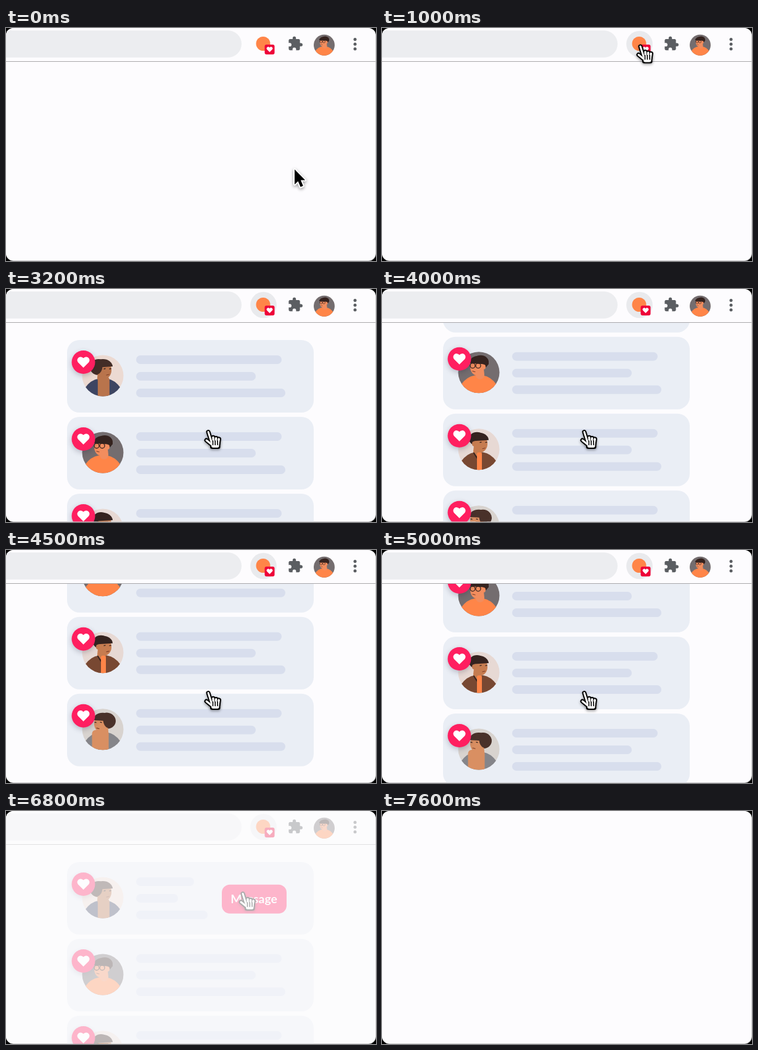
An HTML page with a canvas for the animation above (8400 ms loop, 600 by 379 pixels).

```html
<!DOCTYPE html>
<html lang="en">
<head>
<meta charset="utf-8">
<title>Extension matches</title>
<style>
  html, body { margin: 0; width: 100%; height: 100%; overflow: hidden; background: #000; }
  canvas { display: block; width: 100vw; height: 100vh; }
</style>
</head>
<body>
<canvas id="stage" width="600" height="379"></canvas>
<script>
const ctx = document.getElementById('stage').getContext('2d');
const LOOP = 8400, STEP = 100;
const PAPER = '#fdfcfe', PINK = '#ff1f60', ORANGE = '#ff8548', INK = '#1f1e20', GREY = '#5b5e62';
const DARK = '#35231f';
const CARD_TOP = 83, CARD_PITCH = 125, MAX_SCROLL = 227;

const people = [
  { back: '#ecdad2', skin: '#b9744c', hair: '#432d27', top: '#3d4562', side: 1, arm: 19 },
  { back: '#746d6f', skin: '#f28d5e', hair: DARK, top: ORANGE, side: -1, glasses: true },
  { back: '#e7d9d4', skin: '#c67c50', hair: DARK, top: '#784832', side: 1, tie: true },
  { back: '#d8d3cf', skin: '#d98f62', hair: '#49312a', top: '#85858a', side: -1, arm: 27 }
];

const clamp = v => Math.max(0, Math.min(1, v));
const ease = v => v < .5 ? 2 * v * v : 1 - 2 * (1 - v) ** 2;
const span = (t, from, to) => ease(clamp((t - from) / (to - from)));
const mix = (a, b, k) => a + (b - a) * k;

function box(x, y, w, h, r, fill) {
  ctx.beginPath();
  ctx.roundRect(x, y, w, h, r);
  ctx.fillStyle = fill;
  ctx.fill();
}

function oval(x, y, rx, ry, fill, tilt = 0, from = 0) {
  ctx.beginPath();
  ctx.ellipse(x, y, rx, ry, tilt, from, Math.PI * 2);
  ctx.fillStyle = fill;
  ctx.fill();
}

const disc = (x, y, r, fill) => oval(x, y, r, r, fill);

function line(color, width, x, y, u, v) {
  ctx.beginPath();
  ctx.moveTo(x, y);
  ctx.lineTo(u, v);
  ctx.strokeStyle = color;
  ctx.lineWidth = width;
  ctx.stroke();
}

function text(str, x, y, size, fill, weight = 400, align = 'left') {
  ctx.font = `${weight} ${size}px Lato, sans-serif`;
  ctx.textAlign = align;
  ctx.fillStyle = fill;
  ctx.fillText(str, x, y);
}

function placed(x, y, scale, draw) {
  ctx.save();
  ctx.translate(x, y);
  ctx.scale(scale, scale);
  draw();
  ctx.restore();
}

function shadow(color, blur, dy) {
  ctx.shadowColor = color;
  ctx.shadowBlur = blur;
  ctx.shadowOffsetY = dy;
}

function heart(x, y, r) {
  const lean = Math.PI * .22;
  ctx.beginPath();
  ctx.arc(x - r * .85, y - r * .5, r, Math.PI - lean, -lean);
  ctx.arc(x + r * .85, y - r * .5, r, Math.PI + lean, lean);
  ctx.lineTo(x, y + r * 1.75);
  ctx.fillStyle = '#fff';
  ctx.fill();
}

// One portrait facing right; `side` mirrors it.
function portrait({ skin, hair, top, side, arm, glasses, tie }) {
  ctx.scale(side, 1);
  ctx.lineCap = 'round';
  if (arm) oval(-7, -14, 14, 13, hair, -.2);
  else oval(-3, -17, 13, 11, hair);
  oval(0, 38, 34, 34, top);
  line(skin, 14, -1, -6, -2, 4);
  oval(3, -9, 11, 14, skin);
  oval(0, -14, 16, 13, hair, -.06, Math.PI);
  if (arm) {
    oval(-7, -12, 6, 10, hair, .3);
    box(-5 - arm / 6, 1, arm, 42, 6, skin);
  } else {
    oval(-8, -9, 3, 4, skin);
  }
  if (tie) {
    line(DARK, 2, -8, 6, -3, 14);
    box(-3, 5, 8, 38, 3, ORANGE);
  }
  for (const x of [2, 11]) {
    if (glasses) {
      ctx.beginPath();
      ctx.arc(x - 1, -11, 4, 0, 7);
      ctx.strokeStyle = DARK;
      ctx.lineWidth = 1.3;
      ctx.stroke();
    } else {
      line(DARK, 1.3, x, -11, x + 2, -11.5);
    }
  }
  line('#7d3d27', 1.2, 6, -1, 10, -2);
}

function avatar(person, x, y, r) {
  placed(x, y, r / 33.5, () => {
    disc(0, 0, 33.5, person.back);
    ctx.clip();
    portrait(person);
  });
}

function puzzle() {
  box(2, 5, 17, 17, 2, GREY);
  box(8, 1, 5, 7, 2.5, GREY);
  box(16, 11, 7, 5, 2.5, GREY);
  box(0, 10.8, 6.2, 5.4, 2.7, PAPER);
  box(7.8, 17.8, 5.4, 6.2, 2.7, PAPER);
}

function toolbar(t) {
  box(-40, 4, 422, 44, 22, '#ecedf0');
  ctx.fillStyle = '#a8a7aa';
  ctx.fillRect(0, 54, 600, 1);
  if (t >= 800) disc(417.5, 26, 21.3, '#e9eaed');
  disc(417, 25.5, 11.5, ORANGE);
  box(419.5, 27, 16, 16, 3, '#ee0339');
  heart(427.5, 34.6, 2.6);
  placed(456.3, 12.7, 1.07, puzzle);
  avatar(people[1], 516, 27.7, 17);
  for (let i = -1; i < 2; i++) disc(566, 26.3 + 7.8 * i, 2.5, GREY);
}

function card(person, y, open) {
  box(99, y, 400, 118, 20, '#eaeef5');
  avatar(person, 157, y + 58, 33.5);
  ctx.save();
  shadow('rgba(30,30,60,.25)', 8, 3);
  disc(125.5, y + 36, 19, PINK);
  ctx.restore();
  heart(125.5, y + 35.5, 5.4);
  const wide = [236, 194, 242], narrow = [94, 68, 116];
  wide.forEach((w, i) => box(211, y + 25 + 27 * i, mix(w, narrow[i], open), 14, 7, '#d8deed'));
  if (!open) return;
  ctx.save();
  ctx.globalAlpha *= open;
  box(350, y + 36.7, 105, 47, 13, PINK);
  text('Message', 402, y + 66.5, 19.4, '#fff', 700, 'center');
  ctx.restore();
}

function matches(t) {
  const show = span(t, 2400, 2900);
  if (!show) return;
  const scroll = MAX_SCROLL * (span(t, 3300, 4600) - span(t, 4800, 5520));
  const open = span(t, 5400, 5700);
  ctx.save();
  ctx.beginPath();
  ctx.rect(0, 55, 600, 324);
  ctx.clip();
  ctx.globalAlpha *= show;
  const first = CARD_TOP - scroll + 24 * (1 - show);
  people.forEach((person, i) => card(person, first + CARD_PITCH * i, i ? 0 : open));
  ctx.restore();
}

function menu(t, cursor) {
  const show = span(t, 1000, 1300) * (1 - span(t, 2200, 2500));
  if (!show) return;
  ctx.save();
  ctx.globalAlpha *= show;
  ctx.save();
  shadow('rgba(40,40,50,.2)', 44, 10);
  box(97, 48.5, 348, 215, 18, PAPER);
  ctx.restore();
  text('Dorvell mode', 123, 101, 22.7, INK);
  box(362.5, 77, 57.5, 31.5, 15.75, ORANGE);
  disc(404, 92.5, 13, '#fff');
  ctx.fillStyle = '#e2e1e4';
  ctx.fillRect(123, 130, 297, 1);
  text('My dorvells', 123, 177, 22.7, INK);
  if (cursor.y > 194) box(110, 194, 323, 50, 9, '#f4f2f4');
  text('My matches', 123, 227.5, 22.7, INK);
  box(367, 203.2, 53, 32, 16, PINK);
  text('New', 393.5, 224.3, 16, '#fff', 400, 'center');
  ctx.restore();
}

function cursorAt(t) {
  const stops = [[300, 800, 419, 28], [1300, 1800, 332.5, 222], [2400, 2900, 328, 230.5], [5400, 6000, 384, 132.5]];
  let x = 468, y = 230;
  for (const [from, to, u, v] of stops) {
    const k = span(t, from, to);
    x = mix(x, u, k);
    y = mix(y, v, k);
  }
  return { x, y };
}

function arrow() {
  const shape = new Path2D('M0 0V24.5L5.6 19.2L9.6 28.6L13.8 26.8L9.9 17.6H17.2z');
  ctx.strokeStyle = '#fff';
  ctx.lineWidth = 4;
  shadow('rgba(0,0,0,.4)', 5, 2);
  ctx.stroke(shape);
  shadow('transparent', 0, 0);
  ctx.fillStyle = '#000';
  ctx.fill(shape);
}

// Fingers and palm are laid down in black, then again thinner in white.
function hand() {
  for (const [color, rim] of [['#000', 2], ['#fff', -2]]) {
    if (rim > 0) shadow('rgba(0,0,0,.35)', 4, 2);
    else shadow('transparent', 0, 0);
    line(color, 5 + rim, 7, 4, 12, 20);
    line(color, 5 + rim, 4, 17.5, 12, 24);
    for (let i = 0; i < 3; i++) line(color, 5.5 + rim, 15 + 4.6 * i, 13 + 1.3 * i, 15.5 + 3.6 * i, 24);
    box(11 - rim / 2, 18 - rim / 2, 14.5 + rim, 12.5 + rim, 3, color);
  }
  for (let i = 0; i < 3; i++) line('#000', 1.6, 14.5 + 3.8 * i, 18.5, 14.5 + 3.8 * i, 25);
}

function drawCursor(t, { x, y }) {
  ctx.save();
  ctx.lineJoin = ctx.lineCap = 'round';
  if (t < 800) placed(x, y, 1, arrow);
  else placed(x - 7, y - 2, 1, hand);
  ctx.restore();
}

function render(t) {
  ctx.fillStyle = '#000';
  ctx.fillRect(0, 0, 600, 379);
  box(0, 0, 600, 379, 12, '#b9b9bb');
  box(0, 0, 599.3, 378.2, 12, PAPER);

  const gone = span(t, 6500, 7000);
  if (gone === 1) return;
  const cursor = cursorAt(t);
  ctx.save();
  ctx.clip();
  toolbar(t);
  matches(t);
  menu(t, cursor);
  drawCursor(t, cursor);
  // Everything dissolves together into the empty page.
  ctx.globalAlpha = gone;
  ctx.fillStyle = PAPER;
  ctx.fillRect(0, 0, 600, 379);
  ctx.restore();
}

function tick() {
  const t = performance.now() % LOOP;
  render(Math.floor(t / STEP) * STEP);
  requestAnimationFrame(tick);
}
tick();
</script>
</body>
</html>
```
